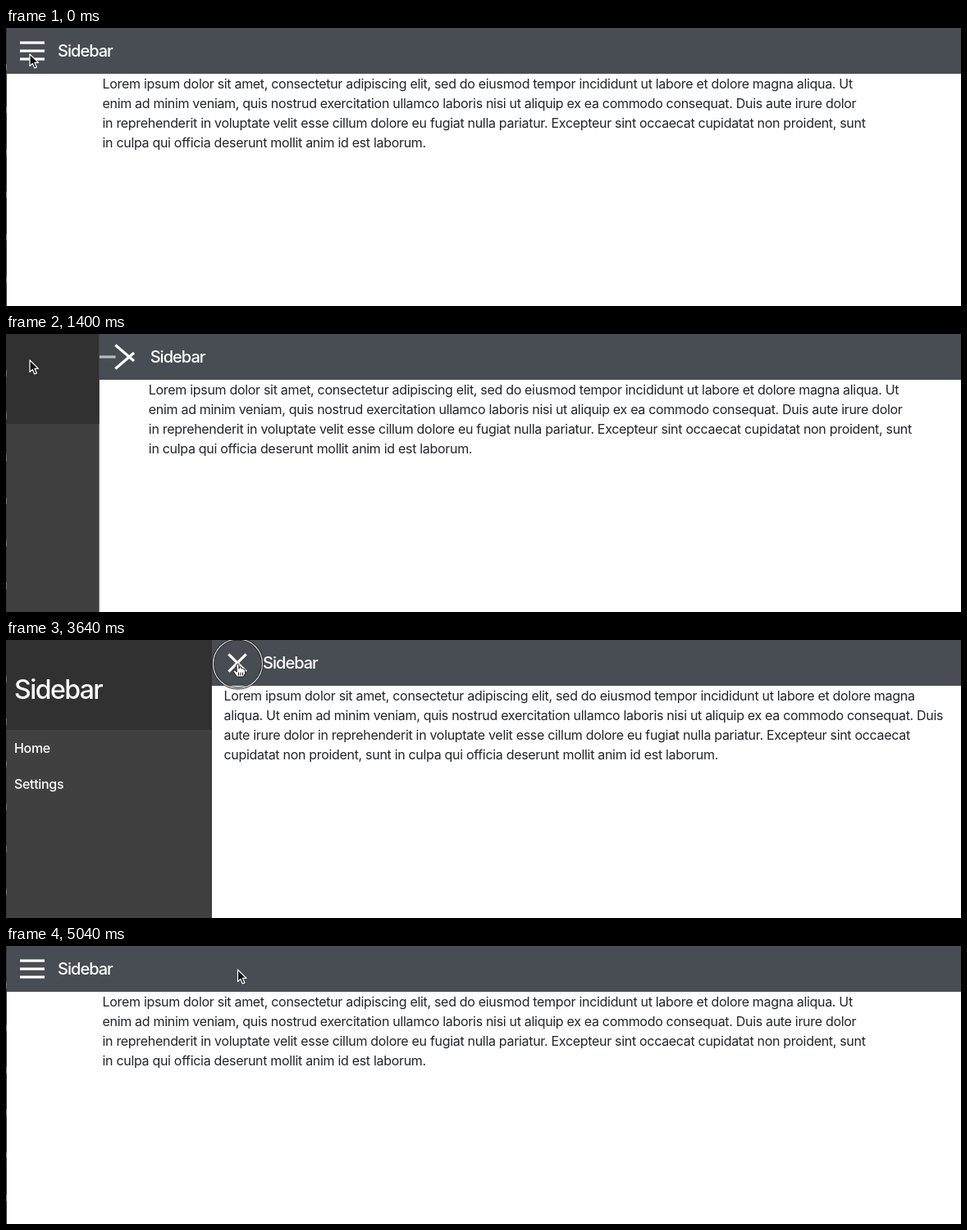
Animation of 1164 by 340 pixels, one loop 5.11 s. Source, as an HTML page:

```html
<!DOCTYPE html>
<html lang="en">
<head>
<meta charset="utf-8">
<title>Sidebar</title>
<style>
  html, body { margin: 0; width: 100%; height: 100%; overflow: hidden; background: #fff; }
  body {
    position: relative;
    font: 16px/24px Inter, "Open Sans", sans-serif;
    font-optical-sizing: none;
    letter-spacing: -.31px;
    color: #212529;
  }
  body > * { position: absolute; left: 0; top: 0; }
  header { width: 1164px; height: 56px; background: #484c53; color: #fff; }
  header svg { position: absolute; left: 0; top: 0; overflow: visible; }
  header line { stroke: #fff; stroke-width: 3.2; }
  header span {
    position: absolute; left: 62px; top: 0;
    font-size: 20px; line-height: 56px; font-weight: 500; letter-spacing: -.049em;
  }
  p { margin: 0; top: 56px; white-space: pre; }
  nav { width: 251px; height: 340px; background: #404040; color: #fff; font-weight: 500; }
  nav * { position: absolute; left: 10px; margin: 0; }
  nav h2 {
    left: 0; top: 0; width: 241px; height: 110px; padding-left: 10px; background: #313131;
    font-size: 32px; line-height: 122px; font-weight: 450; letter-spacing: -.048em;
  }
  #rim {
    width: 1px; height: 340px;
    background: repeating-linear-gradient(#343434 0 44px, #6c6c6c 44px 52px);
  }
  #pointer { overflow: visible; }
</style>
</head>
<body>
<header>
  <svg width="62" height="56">
    <line id="top" x1="-15" x2="15"/>
    <line id="middle" x1="-15" x2="15"/>
    <line id="bottom" x1="-15" x2="15"/>
  </svg>
  <span>Sidebar</span>
</header>
<p></p>
<nav>
  <h2>Sidebar</h2>
  <div style="top:120px">Home</div>
  <div style="top:164px">Settings</div>
</nav>
<div id="rim"></div>
<svg id="pointer" width="1" height="1">
  <g id="ring" fill="none">
    <circle r="30" stroke="#222" stroke-width="3"/>
    <circle r="30" stroke="#ddd" stroke-width="1.2"/>
  </g>
  <path id="arrow" d="M0 0V14.5L3.4 11.4L5.8 17L8.4 15.9L6 10.4H10.5Z"
        fill="#111" stroke="#fff" stroke-width="1.2" stroke-linejoin="round"/>
  <g id="hand" stroke="#111" stroke-linejoin="round" stroke-linecap="round">
    <path d="M-1.5 1.2Q0-.8 1.5 1.2V6Q3-0 4.5 6Q6 4.6 7 6.8Q9 6 9 8.5V12L7 16H-1L-5.5 9.5Q-5.5 7-3 8.3L-1.5 9.8Z" fill="#fff"/>
    <path d="M1 11V14M3.5 11V14M6 11V14" fill="none"/>
  </g>
</svg>
<script>
const LOOP = 5110, STEP = 70;
const CLOSED = 1, OPEN = 251;
const $ = selector => document.querySelector(selector);

const WIDE = `Lorem ipsum dolor sit amet, consectetur adipiscing elit, sed do eiusmod tempor incididunt ut labore et dolore magna aliqua. Ut
enim ad minim veniam, quis nostrud exercitation ullamco laboris nisi ut aliquip ex ea commodo consequat. Duis aute irure dolor
in reprehenderit in voluptate velit esse cillum dolore eu fugiat nulla pariatur. Excepteur sint occaecat cupidatat non proident, sunt
in culpa qui officia deserunt mollit anim id est laborum.`;
const NARROW = WIDE.replace(/\n/g, ' ')
  .replace(/ (aliqua\.|aute|cupidatat)/g, '\n$1');

const progress = (t, from, to) => Math.min(1, Math.max(0, (t - from) / (to - from)));
const within = (t, from, to) => t >= from && t < to;
const mix = (a, b, f) => a + (b - a) * f;
const slide = (u, power) => .15 * u + .85 * u ** power;
const move = (el, x, y = 0, angle = 0) => {
  el.style.transform = `translate(${x}px, ${y}px) rotate(${angle}deg)`;
};
const show = (el, on) => { el.style.display = on ? '' : 'none'; };

const header = $('header'), nav = $('nav'), text = $('p'), pointer = $('#pointer');
const topBar = $('#top'), middleBar = $('#middle'), bottomBar = $('#bottom');
const ring = $('#ring'), arrow = $('#arrow'), hand = $('#hand');

// Menu icon: 0 is three bars, 1 is a cross, with an arrow halfway.
function drawIcon(m) {
  const offset = 10 * (1 - m * m), angle = 45 * Math.sin(m * Math.PI / 2);
  move(topBar, 31, 28 - offset, angle);
  move(bottomBar, 31, 28 + offset, -angle);
  move(middleBar, 31 - 36 * m, 28);
  middleBar.style.opacity = 1 - m ** 3;
}

function drawPointer(t) {
  const sweep = 1 - (1 - progress(t, 1890, 2450)) ** 3;
  const drift = progress(t, 2450, 3220);
  const x = mix(29, 262, sweep) + 20.5 * drift;
  const y = mix(32, 28, sweep) - 6 * Math.sin(Math.PI * sweep) + drift;
  move(pointer, x, y);

  const overButton = within(t, 840, 1190) || within(t, 2940, 3990);
  show(hand, overButton);
  show(arrow, !overButton);
  show(ring, within(t, 840, 1050) || within(t, 3640, 3780));
}

function draw(t) {
  const opening = progress(t, 1000, 1470), closing = progress(t, 3760, 4270);
  const edge = mix(CLOSED, OPEN, slide(opening, 6) - slide(closing, 2));
  move(header, edge);
  move(nav, edge - OPEN);
  drawIcon(opening ** 2 - closing ** 2);

  // The text block is centred until it no longer fits beside the sidebar.
  move(text, Math.max((1164 + edge) / 2 - 465, edge + 14.5));
  const lines = edge > 214 ? NARROW : WIDE;
  if (text.textContent !== lines) text.textContent = lines;

  drawPointer(t);
}

const start = performance.now();
function tick() {
  const t = (performance.now() - start) % LOOP;
  draw(Math.floor(t / STEP) * STEP);
  requestAnimationFrame(tick);
}
tick();
</script>
</body>
</html>
```
